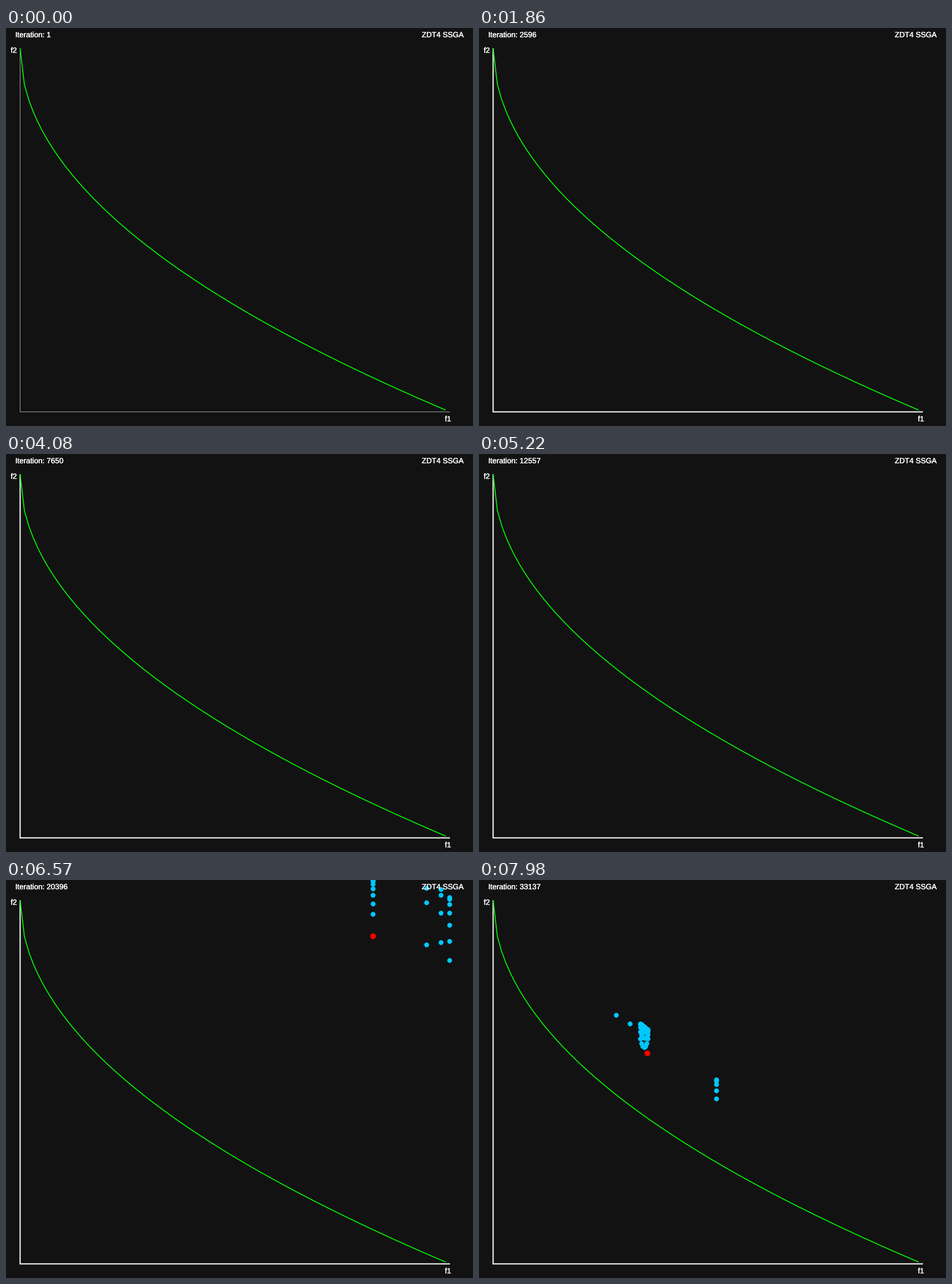
Write a matplotlib script that moves like this. It is 811 px wide and 690 px high and loops after 8 s.

```python
import random

import matplotlib.pyplot as plt
import numpy as np
from matplotlib.animation import FuncAnimation
from matplotlib.patheffects import withStroke

W, H = 811, 690
DPI = 64                      # a power of two keeps the pixel size exact
PT = 72 / DPI                 # points per pixel
LOOP, TICK, STEP = 8000, 20, 30
X0, Y0, SX, SY = 24.5, 665.5, 746.5, 630.5
BG, GREEN, CYAN, RED = "#121212", "#00ff00", "#00c8ff", "#ff0000"

plt.rcParams["font.family"] = "Liberation Sans"
plt.rcParams["text.hinting"] = "none"

# The counter speeds up; the population's best and worst g shrink
COUNTER = ([0, 62, 99, 163, 174, 219, 239, 266],
           [1, 2596, 4348, 10060, 12557, 20396, 26430, 33137])
STAGES = [200, 219, 239, 266]
BEST = [2.7, 2.26, 1.759, 1.245]
WORST = [2.8, 2.645, 1.892, 1.345]


def front(x, g):
    """Pixel height of an individual with distance g."""
    f1 = (x - X0) / SX
    return Y0 - SY * (g - np.sqrt(f1 * g))


def distance(x, y):
    """Inverse of front: g of an individual at a pixel."""
    f1, f2 = (x - X0) / SX, (Y0 - y) / SY
    return ((np.sqrt(f1) + np.sqrt(f1 + 4 * f2)) / 2) ** 2


def column(x, top, bottom, n):
    """Individuals sharing f1, crowded towards the top."""
    u = np.linspace(0, 1, n)
    return [(x, y) for y in top + (bottom - top) * u ** 2]


def drifters(rng, xs, lo, hi, n):
    """Individuals with random g that bridge two stages."""
    picks = [(rng.choice(xs), rng.uniform(lo, hi)) for _ in range(n)]
    return [(x, front(x, g)) for x, g in picks]


def make_population():
    rng = random.Random(4)
    pop = [(637, 97), (412, 158), (507, 230), (292, 300)]    # leaders
    pop += drifters(rng, [754.5, 770], 2.65, 2.75, 10)
    pop += column(637, 0, 59, 7) + column(730, 14, 112, 3)
    pop += column(754.5, 16, 108, 4) + column(770, 30, 139, 7)

    pop += drifters(rng, [637, 560, 432], 1.98, 2.25, 25)
    pop += [(x, front(x, 1.887)) for x in (339, 354, 367, 404)]
    pop += column(412, 100, 132, 3) + column(432, 116, 167, 9)

    pop += drifters(rng, [432, 412, 340, 292], 1.35, 1.74, 45)
    pop += [(238, 234), (262, 249)] + column(412, 346, 379, 5)
    for u in np.linspace(0, 1, 7):
        x = 280 + 13 * u
        pop += column(x, front(x, 1.338), 275 + 15 * np.sin(np.pi * u), 5)

    x, y = np.array(pop).T
    return np.column_stack([x, y, distance(x, y)])


population = make_population()

fig = plt.figure(figsize=(W / DPI, H / DPI), dpi=DPI, facecolor=BG)
ax = fig.add_axes([0, 0, 1, 1])
ax.set_xlim(0, W)
ax.set_ylim(H, 0)
ax.axis("off")


def line(xs, ys, color, width, z):
    return ax.plot(xs, ys, color=color, lw=width * PT, zorder=z, snap=False,
                   solid_capstyle="butt", solid_joinstyle="miter")[0]


def label(x, y, text):
    bold = withStroke(linewidth=0.35 * PT, foreground="white")
    return ax.text(x, y, text, color="white", fontsize=13.1 * PT,
                   va="baseline", zorder=5, path_effects=[bold])


def dots(color, diameter, z):
    return ax.scatter([], [], s=(diameter * PT) ** 2, c=color, lw=0, zorder=z)


frame_line = line([X0, X0, X0 + SX], [35, Y0, Y0], "white", 1, 1)
f1 = np.arange(100) / 100
line(X0 + SX * f1, Y0 - SY * (1 - np.sqrt(f1)), GREEN, 1.6, 2)

cyan = dots(CYAN, 8.4, 3)
red = dots(RED, 10, 4)

counter = label(16, 16, "")
label(722, 16, "ZDT4 SSGA")
label(8, 43, "f2")
label(762, 682, "f1")


def draw(i):
    step = (i * TICK + TICK // 2) // STEP

    # Repainting the axes makes them brighter and wider
    frame_line.set_alpha(1 - 0.4 ** (step + 1))
    frame_line.set_linewidth((2 - 0.8 ** step) * PT)
    counter.set_text(f"Iteration: {round(np.interp(step, *COUNTER))}")

    g = population[:, 2]
    best = np.interp(step, STAGES, BEST)
    worst = np.interp(step, STAGES, WORST)
    alive = population[(g >= best) & (g <= worst)]
    alive = alive[np.argsort(alive[:, 2])]
    red.set_offsets(alive[:1, :2])
    cyan.set_offsets(alive[1:, :2])
    if step < STAGES[0]:
        red.set_offsets(np.empty((0, 2)))
        cyan.set_offsets(np.empty((0, 2)))
    return [frame_line, counter, cyan, red]


anim = FuncAnimation(fig, draw, frames=LOOP // TICK, interval=TICK,
                     repeat=True, repeat_delay=0, blit=False)
plt.show()
```
